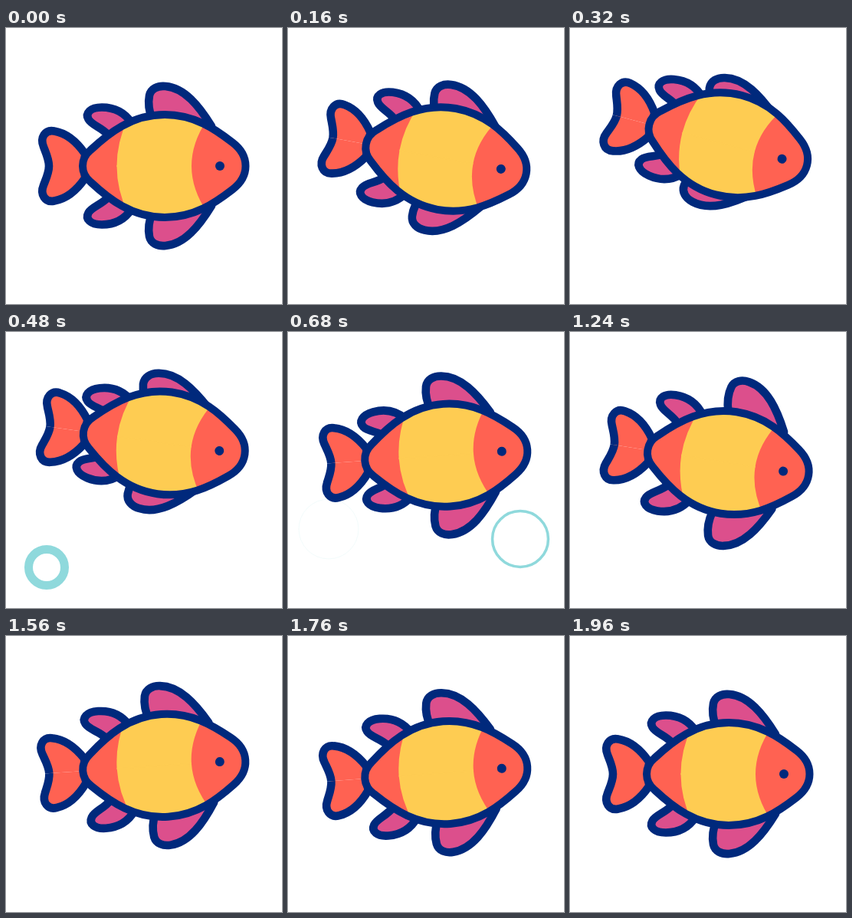
Write an HTML page with a canvas that moves like this. It is 360 px wide and 360 px high and loops after 2000 ms.

```html
<!DOCTYPE html>
<html lang="en">
<head>
<meta charset="utf-8">
<title>Swimming fish</title>
<style>
html, body { margin: 0; width: 100%; height: 100%; overflow: hidden; background: #fff; }
canvas { display: block; width: 100%; height: 100%; }
</style>
</head>
<body>
<canvas id="stage" width="360" height="360"></canvas>
<script>
const ctx = document.getElementById('stage').getContext('2d');
const LOOP = 2000, STEP = 40, MID = 180;
const NAVY = '#00297c', CORAL = '#ff6252', YELLOW = '#fecc52', PINK = '#dc4f8c', AQUA = '#8fd9dc';

// Shapes for the upper half; the lower half is their mirror image.
const halfBody = new Path2D('M100 180C100 170 104 164.5 110 159.5C134 137 164 113 207 113' +
  'C246 113 273 132 295 149C307 158 312.5 169 312.5 180');
const halfBand = new Path2D('M150 180H144.5Q144.5 149 159 118V105H262V120Q242 150 242 180Z');
const halfTail = new Path2D('M103 180V164C92 148 78 137 63 134.5C51 132 44 143 49 155C52 163 56 171 56 180');
const frontFin = new Path2D('M191 120C187 110 185 98 187 88C189 79 198 75 208 76C233 78 252 102 268 128Z');
const rearFin = new Path2D('M164 124C154 109 139 103.5 125 103.5C110 103.5 103 111 107.5 119C112 127 124 129 134 140Z');

function mirror(half) {
  const whole = new Path2D(half);
  whole.addPath(half, new DOMMatrix([1, 0, 0, -1, 0, 2 * MID]));
  return whole;
}
const body = mirror(halfBody), band = mirror(halfBand);

const clamp = u => Math.min(1, Math.max(0, u));
const bump = (t, start, span) => Math.sin(Math.PI * clamp((t - start) / span)) ** 2;
const swing = (t, start, span) => Math.sin(2 * Math.PI * clamp((t - start) / span));
const easeOut = u => 1 - (1 - clamp(u)) ** 3;

// One strong stroke, then a weaker one.
function pose(t) {
  const strong = bump(t, 0, 920), weak = bump(t, 960, 900);
  return {
    lift: 35.7 * strong + 14.5 * weak,
    tilt: 9.3 * strong + 8.9 * swing(t, 0, 920) + 3.2 * weak + 7.2 * swing(t, 960, 900),
    front: 14 * bump(t, 720, 660) - 19 * bump(t, 0, 720),
    rear: -14.4 * bump(t, 0, 1040)
  };
}

function turn(x, y, deg) {
  ctx.translate(x, y);
  ctx.rotate(deg * Math.PI / 180);
  ctx.translate(-x, -y);
}

function paintPair(path, color, x, y, deg) {
  for (const side of [1, -1]) {
    ctx.save();
    ctx.translate(0, MID);
    ctx.scale(1, side);
    ctx.translate(0, -MID);
    turn(x, y, deg);
    ctx.fillStyle = color;
    ctx.fill(path);
    ctx.stroke(path);
    ctx.restore();
  }
}

function drawFish(t) {
  const { lift, tilt, front, rear } = pose(t);
  ctx.save();
  ctx.translate(0, -lift);
  turn(204, MID, tilt);
  ctx.strokeStyle = NAVY;
  ctx.lineWidth = 10.6;
  ctx.lineJoin = 'round';
  paintPair(halfTail, CORAL, 0, 0, 0);
  paintPair(rearFin, PINK, 189, 160, rear);
  paintPair(frontFin, PINK, 257, 172, front);
  ctx.fillStyle = CORAL;
  ctx.fill(body);
  ctx.save();
  ctx.clip(body);
  ctx.fillStyle = YELLOW;
  ctx.fill(band);
  ctx.fillRect(144.5, MID - 1, 97.5, 2);
  ctx.restore();
  ctx.lineWidth = 10;
  ctx.lineCap = 'round';
  ctx.stroke(body);
  ctx.fillStyle = NAVY;
  ctx.beginPath();
  ctx.arc(279, MID, 6, 0, Math.PI * 2);
  ctx.fill();
  ctx.restore();
}

// A rising dot that opens into a ring and thins away.
function drawBubble(x, y, age) {
  const outer = 39 * easeOut(age / 274), inner = 39 * easeOut((age - 44) / 300);
  if (outer - inner < 0.1) return;
  ctx.strokeStyle = AQUA;
  ctx.lineWidth = outer - inner;
  ctx.beginPath();
  ctx.arc(x, y - age / 4, (outer + inner) / 2, 0, Math.PI * 2);
  ctx.stroke();
}

function frame(now) {
  const t = Math.floor(now % LOOP / STEP) * STEP;
  ctx.fillStyle = '#fff';
  ctx.fillRect(0, 0, 360, 360);
  drawBubble(53, 332, t - 380);
  drawBubble(303, 320, t - 480);
  drawFish(t);
}

const start = performance.now();
function tick() {
  frame(performance.now() - start);
  requestAnimationFrame(tick);
}
tick();
</script>
</body>
</html>
```
